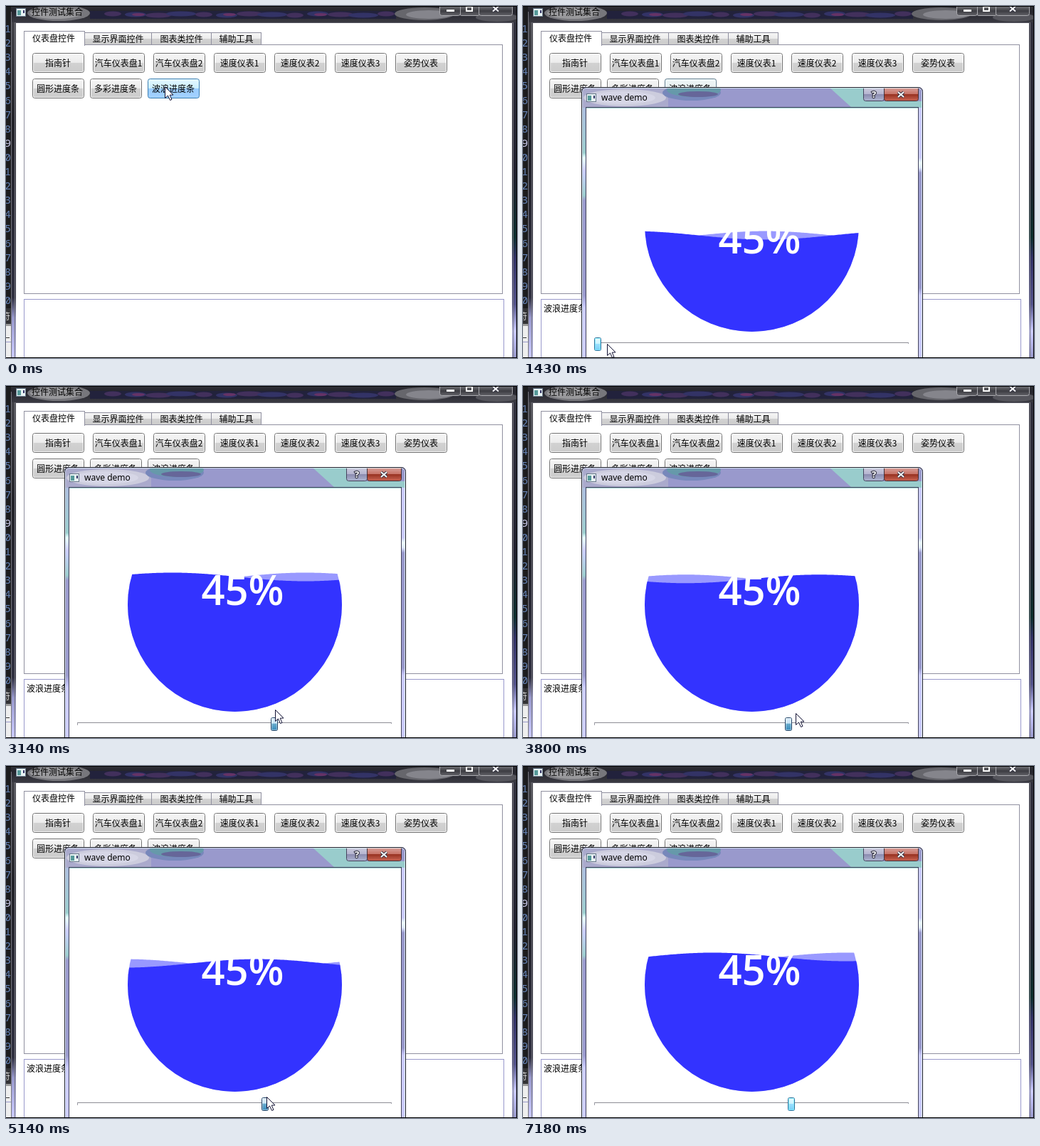
Recreate the animation shown at these times as an HTML page with a canvas. Size 718 by 495 pixels, loop 7.52 s.

```html
<!DOCTYPE html>
<html lang="zh">
<head>
<meta charset="utf-8">
<title>wave demo</title>
<style>
html, body { margin: 0; width: 100%; height: 100%; overflow: hidden; background: #fff; }
canvas { display: block; width: 718px; height: 495px; }
</style>
</head>
<body>
<canvas id="stage" width="718" height="495"></canvas>
<script>
const g = document.getElementById('stage').getContext('2d');
const LOOP = 7520;
const OPEN = 770, GRAB = 2120, DROP = 6520;
const UI = '12px "Noto Sans CJK SC", "Noto Sans CJK", sans-serif';
const LATIN = '12px "Noto Sans", sans-serif';

// start time, slider centre, pointer tip (none = hidden)
const STEPS = [
  [0, 105, 223, 113], [100, 105, 223, 113], [770, 105, 222, 138],
  [1110, 105, 167, 437], [1430, 105, 118, 475], [1780, 105, 106, 474],
  [2120, 161, 163, 474], [2460, 240, 242, 469], [2800, 304, 306, 466],
  [3140, 377, 378, 455], [3460, 450, 470, 460], [3800, 373, 383, 460],
  [4150, 300, 306, 460], [4460, 433, 446, 461], [4830, 494, 496, 463],
  [5140, 364, 366, 465], [5490, 537, 538, 468], [5830, 406, 397, 467],
  [6180, 377, 377, 467], [6520, 377, 648, 187], [6860, 377], [7180, 377]
];
// time, x where the front wave falls through its mean
const DRIFT = [[770, 470.5], [2120, 13], [3140, -423], [4460, -807], [5830, -1302], [7180, -1890]];

function drift(t) {
  let i = 0;
  while (i < DRIFT.length - 2 && t > DRIFT[i + 1][0]) i++;
  const [t0, a] = DRIFT[i], [t1, b] = DRIFT[i + 1];
  return a + (b - a) * (t - t0) / (t1 - t0);
}

function box(x, y, w, h, fill) {
  g.fillStyle = fill;
  g.fillRect(x, y, w, h);
}

function frame(x, y, w, h, color) {
  g.strokeStyle = color;
  g.lineWidth = 1;
  g.strokeRect(x + .5, y + .5, w - 1, h - 1);
}

function round(x, y, w, h, r, fill, line) {
  g.beginPath();
  g.roundRect(x + .5, y + .5, w - 1, h - 1, r);
  g.fillStyle = fill;
  g.fill();
  if (line) {
    g.strokeStyle = line;
    g.lineWidth = 1;
    g.stroke();
  }
}

function blob(x, y, rx, ry, fill) {
  g.beginPath();
  g.ellipse(x, y, rx, ry, 0, 0, 7);
  g.fillStyle = fill;
  g.fill();
}

function text(s, x, y, color = '#000', font = UI, align = 'left') {
  g.font = font;
  g.fillStyle = color;
  g.textAlign = align;
  g.textBaseline = 'alphabetic';
  g.fillText(s, x, y);
}

function fade(y, h, ...stops) {
  const f = g.createLinearGradient(0, y, 0, y + h);
  for (let i = 0; i < stops.length; i += 2) f.addColorStop(stops[i], stops[i + 1]);
  return f;
}

const grey = (y, h) => fade(y, h, 0, '#f6f6f6', .48, '#ececec', .5, '#d2d2d2', 1, '#cbcbcb');
const blue = (y, h) => fade(y, h, 0, '#e6f8ff', .48, '#ccf0ff', .5, '#99ccff', 1, '#a4d2ff');
const red = (y, h) => fade(y, h, 0, '#d9a09a', .45, '#c87468', .5, '#993322', 1, '#cc6655');
const dark = (y, h) => fade(y, h, 0, '#77777c', .5, '#3c3c42', 1, '#66666c');

function cross(x, y) {
  g.lineCap = 'butt';
  for (const [width, color] of [[4, '#333344'], [2, '#fff']]) {
    g.strokeStyle = color;
    g.lineWidth = width;
    g.beginPath();
    g.moveTo(x - 4, y - 3.5); g.lineTo(x + 4, y + 3.5);
    g.moveTo(x + 4, y - 3.5); g.lineTo(x - 4, y + 3.5);
    g.stroke();
  }
}

function appIcon(x, y) {
  box(x, y, 14, 12, '#e8f4f4');
  frame(x, y, 14, 12, '#667788');
  box(x + 2, y + 3, 5, 7, '#559999');
  box(x + 10, y + 3, 2, 4, '#333366');
}

function editorStrip() {
  box(0, 0, 8, 495, '#1c1c1e');
  for (let i = 0; i < 20; i++) {
    text((i + 1) % 10, -2, 37 + i * 20.1, i === 8 ? '#ccccee' : '#6684b8',
      '15px "Noto Sans Mono", monospace');
  }
  box(0, 425, 7, 22, '#333336');
  text('符', -6, 441, '#ddd');
  box(0, 447, 7, 3, '#999');
  box(0, 450, 7, 45, '#eee');
  box(0, 466, 5, 1, '#333');
  box(0, 472, 7, 1, '#99c');
}

function mainGlass(active) {
  box(7, 0, 711, 24, fade(0, 24, 0, '#34343a', .3, '#24242c', 1, '#3c3c44'));
  g.save();
  g.beginPath();
  g.rect(8, 1, 709, 22);
  g.clip();
  box(118, 7, 430, 11, '#22223c');
  for (let i = 0; i < 13; i++) {
    const x = 150 + i * 32;
    blob(x, 12 + (i % 3 - 1), 12 + i % 4 * 3, 3.5, i % 2 ? '#333366' : '#42305c');
    if (i % 4 === 1) blob(x + 4, 12, 9, 2, '#663366');
  }
  blob(74, 10, 44, 11, '#77777c');
  blob(70, 10, 36, 8, '#99999c');
  blob(588, 11, 42, 9, '#66666c');
  blob(594, 12, 32, 6, '#85858c');
  blob(690, 16, 30, 6, '#55555c');
  if (active) box(8, 1, 709, 22, 'rgba(150,150,190,.16)');
  g.restore();

  box(7, 23, 7, 472, fade(23, 472, 0, '#44444a', .3, '#222228', .82, '#303040', .88, '#9999cc', 1, '#ccccff'));
  box(711, 23, 7, 472, fade(23, 472, 0, '#333340', .45, '#222230', .64, '#0e3030', .7, '#333366', .84, '#55558c', .92, '#ccccff', 1, '#9999cc'));
  box(7, 8, 1, 487, '#777780');
  box(12, 23, 1, 472, '#77777f');
  box(712, 23, 1, 472, '#77777f');

  round(609, -4, 30, 18, 3, dark(0, 14), '#aaaaaf');
  round(638, -4, 27, 18, 1, dark(0, 14), '#aaaaaf');
  round(664, -4, 48, 18, 3, active ? red(0, 14) : dark(0, 14), '#aaaaaf');
  box(619, 5, 11, 3, '#fff');
  g.strokeStyle = '#fff';
  g.lineWidth = 2;
  g.strokeRect(647, 1, 8, 6);
  cross(688, 4);
  appIcon(14, 3);
  text('控件测试集合', 36, 13);
}

function button(label, x, y, glow = 0, hot = false) {
  round(x, y, 73, 28, 3, hot ? blue(y, 28) : grey(y, 28), hot ? '#3c7fb1' : '#707070');
  if (!hot) {
    g.strokeStyle = 'rgba(255,255,255,.8)';
    g.beginPath();
    g.roundRect(x + 1.5, y + 1.5, 70, 25, 2);
    g.stroke();
  }
  if (glow) {
    g.globalAlpha = glow;
    round(x, y, 73, 28, 3, 'rgba(200,245,255,.5)', '#3c7fb1');
    g.globalAlpha = 1;
  }
  text(label, x + 36, y + 18.5, '#000', UI, 'center');
}

function mainWindow(t) {
  const opened = t >= OPEN;
  box(14, 24, 697, 471, '#fff');
  box(13, 23, 699, 1, '#555560');
  frame(25, 54, 673, 351, '#9090a0');
  [['显示界面控件', 110, 95], ['图表类控件', 204, 85], ['辅助工具', 288, 71]].forEach(([s, x, w]) => {
    box(x, 37, w, 18, grey(37, 18));
    frame(x, 37, w, 18, '#9090a0');
    text(s, x + w / 2, 50.5, '#000', UI, 'center');
  });
  box(25, 35, 86, 20, '#fff');
  frame(25, 35, 86, 21, '#9090a0');
  box(26, 54, 84, 3, '#fff');
  box(25, 54, 1, 5, '#9090a0');
  text('仪表盘控件', 37, 49.5);

  ['指南针', '汽车仪表盘1', '汽车仪表盘2', '速度仪表1', '速度仪表2', '速度仪表3', '姿势仪表']
    .forEach((s, i) => button(s, 37 + 85 * i, 66));
  button('圆形进度条', 37, 102);
  button('多彩进度条', 118, 102);
  const glow = opened ? Math.max(0, 1 - (t - OPEN) / 1010) : 0;
  button('波浪进度条', 199, 102, glow, !opened);

  box(25, 412, 675, 83, '#fff');
  frame(25, 412, 675, 90, '#9999cc');
  if (opened) text('波浪进度条', 29, 430);
}

function dialog() {
  g.save();
  g.beginPath();
  g.roundRect(82, 114, 480, 400, 6);
  g.clip();
  box(82, 114, 480, 381, '#9999cc');
  box(84, 116, 120, 27, '#aaaacc');
  blob(143, 129, 58, 12, '#ccccdd');
  blob(140, 129, 46, 9, '#d6d6e6');
  blob(237, 122, 41, 11, '#7788bb');
  blob(240, 118, 38, 10, '#6699aa');
  blob(246, 124, 28, 4, '#666699');
  g.beginPath();
  [[430, 114], [482, 114], [482, 134], [562, 134], [562, 143], [462, 143]]
    .forEach(([x, y]) => g.lineTo(x, y));
  g.fillStyle = '#99cccc';
  g.fill();
  box(83, 143, 6, 352, fade(143, 352, 0, '#aabbdd', .18, '#99cccc', .2, '#e6ffff', .25, '#ccccff', .35, '#99cccc', .37, '#9999cc', .75, '#9999cc', .8, '#ccccff', 1, '#ccccff'));
  box(555, 143, 6, 352, fade(143, 352, 0, '#ccccff', .2, '#ccccff', .22, '#eeffff', .24, '#e0e8ff', .26, '#9999cc', .72, '#9999cc', .75, '#ccccff', 1, '#ccccff'));

  round(478, 111, 30, 23, 3, fade(115, 19, 0, '#ccccdd', .48, '#b4b4d0', .5, '#8c8cb0', 1, '#b0b8d4'), '#44445c');
  round(507, 111, 49, 23, 3, red(115, 19), '#44333c');
  g.restore();

  g.lineWidth = 1;
  g.strokeStyle = 'rgba(235,250,255,.75)';
  g.beginPath();
  g.roundRect(83.5, 115.5, 477, 400, 5);
  g.stroke();
  g.strokeStyle = '#22222c';
  g.beginPath();
  g.roundRect(82.5, 114.5, 479, 400, 6);
  g.stroke();

  const bold = 'bold 13px "Noto Sans", sans-serif';
  g.font = bold;
  g.textAlign = 'center';
  g.strokeStyle = '#444455';
  g.lineWidth = 2.5;
  g.strokeText('?', 493, 129);
  text('?', 493, 129, '#fff', bold, 'center');
  cross(531, 124.5);
  appIcon(89, 123);
  text('wave demo', 110, 133, '#000', LATIN);

  box(88, 142, 468, 353, '#44445c');
  box(89, 143, 466, 1, '#99cccc');
  box(89, 144, 466, 351, '#fff');
}

function water(level, cx, side, color) {
  g.beginPath();
  g.moveTo(170, 460);
  for (let x = 170; x <= 474; x += 2) {
    g.lineTo(x, level + side * 6 * Math.sin((x - cx) * 2 * Math.PI / 375));
  }
  g.lineTo(474, 460);
  g.closePath();
  g.fillStyle = color;
  g.fill();
}

function gauge(p, cx) {
  const level = 458 - p * 301;
  g.save();
  g.beginPath();
  g.arc(321.5, 307.5, 150.5, 0, 7);
  g.clip();
  water(level, cx, -1, '#9999ff');
  water(level, cx, 1, '#3333ff');
  g.restore();
  text('45%', 332.5, p < .5 ? 348 : 308, '#fff', '600 58px "Open Sans", "Noto Sans", sans-serif', 'center');
}

function slider(x, held) {
  box(100, 473, 442, 1, '#8c8c94');
  box(100, 473, 1, 4, '#9c9ca4');
  box(541, 473, 1, 2, '#9c9ca4');
  const fill = held
    ? fade(466, 19, 0, '#ddeeff', .42, '#cce6f6', .5, '#66aacc', 1, '#3388bb')
    : fade(466, 19, 0, '#e8fcff', .45, '#ccf4ff', .5, '#99e0ff', 1, '#77ccf4');
  round(x - 5, 466, 10, 19, 2, fill, held ? '#224466' : '#336f99');
  frame(x - 4, 467, 8, 17, held ? 'rgba(255,255,255,.4)' : 'rgba(120,240,255,.7)');
}

function pointer(x, y) {
  g.beginPath();
  [[0, 0], [0, 16], [4, 12.5], [7, 19], [9.5, 18], [6.7, 11.7], [11.5, 11.5]]
    .forEach(([dx, dy]) => g.lineTo(x + .5 + dx, y + .5 + dy));
  g.closePath();
  g.fillStyle = '#fff';
  g.fill();
  g.strokeStyle = '#111133';
  g.lineWidth = 1;
  g.stroke();
}

function draw(now) {
  const time = now % LOOP;
  const [t, sx, mx, my] = STEPS.filter(s => s[0] <= time).pop();
  editorStrip();
  mainGlass(t === 100);
  mainWindow(t);
  if (t >= OPEN) {
    dialog();
    // the gauge keeps its preset value until the slider is first moved
    gauge(t < GRAB ? .45 : (sx - 105) / 432, drift(t));
    slider(sx, t >= GRAB && t < DROP);
  }
  if (mx !== undefined) pointer(mx, my);
  box(0, 0, 718, 1, '#000');
  box(0, 494, 718, 1, '#000');
  box(717, 0, 1, 495, '#000');
}

const start = performance.now();
function tick() {
  draw(performance.now() - start);
  requestAnimationFrame(tick);
}
tick();
</script>
</body>
</html>
```
